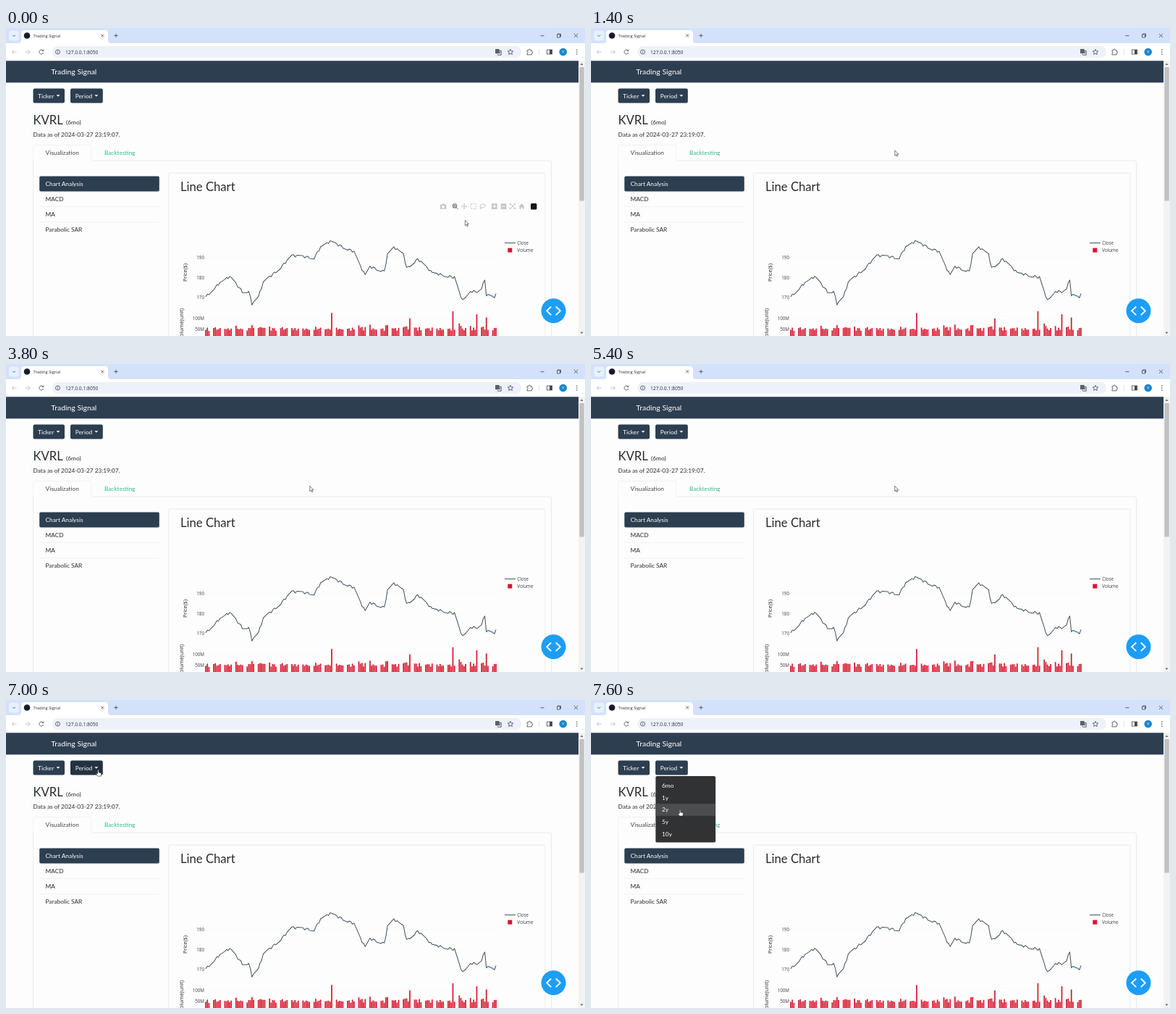
These frames come from a looping animation (800x425 px, 8 s). An HTML page:

```html
<!DOCTYPE html>
<html lang="en">
<head>
<meta charset="utf-8">
<title>Trading Signal</title>
<style>
html, body { margin: 0; width: 100%; height: 100%; overflow: hidden; background: #fdfdfd; }
svg { display: block; width: 800px; height: 425px; }
text { font: 8.33px Lato, sans-serif; fill: #272b2f; white-space: pre; }
.ui text, .plot text { font-family: "Open Sans", sans-serif; }
.plot text { font-size: 6.25px; fill: #3a3f48; }
.plot .axis { font-size: 7.29px; fill: #25282c; text-anchor: middle; }
.plot .end { text-anchor: end; }
text.white { fill: #fff; }
text.head { font-size: 16.67px; }
.icon { fill: none; stroke: #474747; stroke-width: .8; }
.dim { stroke: #b4b6ba; }
.edge { fill: none; stroke: #dee2e6; stroke-width: .7; }
.soft { stroke: #eaecef; }
.navy { fill: #2c3e50; }
#bar { fill: none; stroke: #c3c5c9; stroke-width: 1; }
#bar .solid { fill: #c3c5c9; stroke: none; }
</style>
</head>
<body>
<svg viewBox="0 0 800 425">
  <rect width="800" height="425" fill="#fdfdfd"/>

  <!-- browser window -->
  <g class="ui">
    <rect width="800" height="24" fill="#d3e1fa"/>
    <rect x="4" y="3.5" width="14" height="14" rx="4" fill="#e8f0fd"/>
    <path class="icon" d="M9 9.7l2 2 2-2"/>
    <path d="M17 21q4 0 4-4V7q0-4 4-4h112q4 0 4 4v10q0 4 4 4z" fill="#fff"/>
    <rect y="21" width="800" height="24.3" fill="#fff"/>
    <circle cx="29" cy="10.5" r="4.3" fill="#151a2c"/>
    <text x="37.5" y="12.8" style="font-size:5.8px">Trading Signal</text>
    <path class="icon" d="M131.2 8.5l4 4m0-4l-4 4M149.3 10.5h5.4m-2.7-2.7v5.4M738.5 10.7h5M785 8l5 5m0-5l-5 5"/>
    <path class="icon" d="M761.5 9h4v4h-4zM762.5 9V8h4v4h-1"/>
    <path class="icon dim" d="M14.5 33H8.3m2.8-2.8L8.3 33l2.8 2.8M27 33h6.2m-2.8-2.8l2.8 2.8-2.8 2.8"/>
    <path class="icon" d="M51.3 31.2a3 3 0 1 0 .5 2.7M51.8 29.6v2.2h-2.2"/>
    <rect x="64" y="25" width="648" height="16" rx="8" fill="#eef1f9"/>
    <circle cx="71.5" cy="33" r="3" class="icon"/>
    <path class="icon" d="M71.5 32.6v2M71.5 31.1v.7"/>
    <text x="82" y="35.5" style="font-size:6.7px">127.0.0.1:8050</text>
    <rect x="676" y="29" width="5.6" height="6" fill="#5b6068"/>
    <path class="icon" d="M680 31.3h4.2v6h-4.4l-1-2M681.3 33h2m-1 0v2.6"/>
    <path class="icon" d="M697 29.3l1.1 2.5 2.7.2-2.1 1.8.7 2.7-2.4-1.4-2.4 1.4.7-2.7-2.1-1.8 2.7-.2z"/>
    <path class="icon" d="M720 30.7h2.2q0-1.7 1.2-1.7t1.2 1.7h1.7v2q1.5 0 1.5 1.1t-1.5 1.1v2H720v-2q1.2-.2 1.2-1.1T720 32.6z"/>
    <path d="M736.5 29v8" stroke="#c8d6f0" stroke-width=".7"/>
    <rect x="747.5" y="30" width="7" height="6" class="icon"/>
    <rect x="751" y="30" width="3.5" height="6" fill="#474747"/>
    <circle cx="769.7" cy="33" r="5.3" fill="#1787d0"/>
    <text x="769.7" y="35" class="white" text-anchor="middle" style="font-size:5.5px">Y</text>
    <path d="M788.8 30v.01m0 2.99v.01m0 2.99v.01" stroke="#333" stroke-width="1.4" stroke-linecap="round"/>
    <rect x="791" y="45.3" width="9" height="380" fill="#f3f3f3"/>
    <rect x="792.4" y="54" width="6.4" height="184.5" fill="#c1c1c1"/>
    <path d="M793.5 51l2-2.5 2 2.5zM793.5 419.5l2 2.5 2-2.5z" fill="#666"/>
  </g>

  <!-- page -->
  <rect class="navy" y="45.3" width="791" height="30"/>
  <text class="white" x="62.3" y="64" style="font-size:10.42px">Trading Signal</text>
  <rect class="navy" x="37.5" y="83.5" width="43.5" height="20" rx="2.2"/>
  <rect class="navy" id="period" x="89" y="83.5" width="44.8" height="20" rx="2.2"/>
  <text class="white" x="44" y="96.9">Ticker</text>
  <text class="white" x="95.7" y="96.9">Period</text>
  <path d="M69.5 92.2h5l-2.5 2.5zM122.3 92.2h5l-2.5 2.5z" fill="#fff"/>
  <text class="head" x="37.5" y="132.8">KVRL</text>
  <text x="83" y="132.6">(6mo)</text>
  <text x="37.5" y="150" style="font-size:8.25px">Data as of 2024-03-27 23:19:07.</text>
  <path class="edge soft" d="M37.5 183V163.5q0-2 2-2H116q2 0 2 2V183"/>
  <path class="edge" d="M37.5 430V183.2M118 183.2H751.6q2 0 2 2V430"/>
  <text x="54.5" y="175.4" style="fill:#43484d">Visualization</text>
  <text x="135.9" y="175.4" style="fill:#2cba8c">Backtesting</text>
  <rect class="navy" x="46.2" y="204.4" width="165.6" height="21" rx="2"/>
  <path class="edge soft" d="M46 246.6h166M46 267.8h166"/>
  <text class="white" x="54.5" y="217.8">Chart Analysis</text>
  <text x="54.5" y="239.1">MACD</text>
  <text x="54.5" y="260.4">MA</text>
  <text x="54.5" y="281.4">Parabolic SAR</text>
  <rect class="edge" x="224.7" y="200.2" width="520.3" height="240" rx="2"/>
  <text class="head" x="241" y="225">Line Chart</text>

  <g id="bar">
    <path class="solid" fill-rule="evenodd" d="M600 243.8h2l.7-1.2h2.6l.7 1.2h2.3v6H600zM604 244.8a2 2 0 1 0 .01 0z"/>
    <g stroke="#70757c"><circle cx="620" cy="245.5" r="2.6" stroke-width="1.3"/><path d="M622 247.5l2.5 2.5M618.7 245.5h2.6m-1.3-1.3v2.6"/></g>
    <path d="M629.5 246h7.4m-3.7-3.7v7.4M631.9 243.4l1.3-1.3 1.3 1.3m-2.6 5.2l1.3 1.3 1.3-1.3m-3.8-3.8l-1.3 1.2 1.3 1.3m5-2.5l1.3 1.2-1.3 1.3"/>
    <rect x="642.4" y="242.6" width="7" height="7" stroke-dasharray="1.4 1"/>
    <path d="M656 248.3q-2.3-2 0-4.3 3-2.2 5.6-.2 1.4 2.2-1.6 3.8-2.5.8-4 .5-1 1-.3 2"/>
    <path class="solid" fill-rule="evenodd" d="M671 242.3h7.6v7.6H671zM674.2 243.9v1.6h-1.6v1.2h1.6v1.6h1.2v-1.6h1.6v-1.2h-1.6v-1.6zM683.7 242.3h7.6v7.6h-7.6zM685.3 245.5v1.2h4.4v-1.2z"/>
    <path d="M696.6 242.6l6.8 6.8m0-6.8l-6.8 6.8M696.3 244.3v-2h2m3.4 0h2v2m0 3.4v2h-2m-3.4 0h-2v-2"/>
    <path class="solid" d="M708.5 246.3l4-4 4 4h-1v3.4h-2v-2.3h-2v2.3h-2v-3.4z"/>
    <rect x="725" y="242" width="8.4" height="8.4" rx="1.5" fill="#11151c" stroke="none"/>
  </g>

  <g class="plot">
    <path d="M276 316.5H679M276 344.3H679M276 372H679M276 401.2H679M276 415.4H679" stroke="#f3f5f9" stroke-width=".5"/>
    <text class="end" x="274" y="318.7">190</text>
    <text class="end" x="274" y="346.5">180</text>
    <text class="end" x="274" y="374.2">170</text>
    <text class="end" x="274" y="403.4">100M</text>
    <text class="end" x="274" y="417.6">50M</text>
    <text class="axis" transform="translate(250.3 337.5) rotate(-90)">Price($)</text>
    <text class="axis" transform="translate(244.5 408.5) rotate(-90)">Volume(unit)</text>
    <path id="volume" stroke="#d9152c" stroke-width="1.7"/>
    <path id="close" fill="none" stroke="#4b5662" stroke-width="1.05" stroke-linejoin="round"/>
    <path d="M689 296.6h15" stroke="#4b5662" stroke-width="1.05"/>
    <rect x="693.3" y="303.6" width="6" height="6" fill="#d9152c"/>
    <text x="706.3" y="298.8">Close</text>
    <text x="706.3" y="308.9">Volume</text>
  </g>

  <circle cx="756.5" cy="390.3" r="17" fill="#1c9ef8"/>
  <path d="M753.2 384.5l-6 5.8 6 5.8M759.8 384.5l6 5.8-6 5.8" fill="none" stroke="#fff" stroke-width="1.8"/>

  <g id="menu">
    <rect x="89.3" y="105" width="82.8" height="91.6" rx="2.2" fill="#303234"/>
    <rect id="hover" x="89.6" width="82.2" height="16.6" fill="#4b4d4f"/>
  </g>

  <path id="arrow" d="M0 0V7.2L1.7 5.7 2.8 8.3 4 7.8 2.9 5.3H5.1z" fill="#fff" stroke="#222" stroke-width=".6"/>
  <path id="hand" d="M-.8.8Q0-.6.8.8V3.4L3.6 4Q4.6 4.4 4.4 5.5L3.8 8.6H-.6L-2.9 5.4Q-2.7 4.3-.8 5.5z" fill="#fff" stroke="#222" stroke-width=".6"/>
</svg>
<script>
const $ = id => document.getElementById(id);

// Turning points of the price: [day, dollars]
const turns = [[0, 170.4], [9, 177.5], [15, 180.5], [23, 173], [27, 173], [29, 166.9], [33, 170.3],
  [36, 177.5], [47, 185], [54, 191], [68, 189.8], [72, 195], [78, 198], [93, 192.8], [97, 185.6],
  [100, 181.2], [103, 185.4], [112, 183], [114, 191.4], [118, 195], [124, 191.7], [126, 184.6],
  [133, 189.2], [142, 182.4], [156, 180], [160, 170.1], [162, 169], [166, 173], [172, 173],
  [175, 178.7], [176, 171.4], [181, 169.8], [182, 172.5]];
const surges = { 79: 128, 128: 102, 155: 137, 170: 122, 176: 106 };  // volume in millions
const lastDay = 182;

function price(day) {
  const i = Math.max(1, turns.findIndex(turn => turn[0] >= day));
  const [d0, p0] = turns[i - 1], [d1, p1] = turns[i];
  return p0 + (p1 - p0) * (day - d0) / (d1 - d0) + .6 * Math.sin(day * 2.1);
}

let line = "", bars = "", previous = price(0);
for (let day = 0; day <= lastDay; day++) {
  if (day % 7 === 3 || day % 7 === 4) continue;  // weekend
  const x = 276 + day * 2.203, dollars = price(day);
  const million = surges[day] ?? 46 + 5 * Math.abs(dollars - previous) + 6 * Math.sin(day * 2.4);
  line += `${line ? "L" : "M"}${x} ${316.5 - (dollars - 190) * 2.775}`;
  bars += `M${x} 429.6V${429.6 - million * .284}`;
  previous = dollars;
}
$("close").setAttribute("d", line);
$("volume").setAttribute("d", bars);

["6mo", "1y", "2y", "5y", "10y"].forEach((label, i) =>
  $("menu").insertAdjacentHTML("beforeend", `<text class="white" x="98" y="${121.1 + i * 16.6}">${label}</text>`));

// Pointer steps: start time, place, and the menu row under it (-1: none)
const steps = [
  { t: 0, x: 634.3, y: 265.3, bar: true },
  { t: 1000, x: 570, y: 237, bar: true },
  { t: 1200, x: 450, y: 182 },
  { t: 1400, x: 419.8, y: 168.9 },
  { t: 2800, x: 419.8, y: 168.4 },
  { t: 6800, x: 160.5, y: 96 },
  { t: 7000, x: 127.3, y: 96.5, hand: true, button: true },
  { t: 7200, x: 126.3, y: 96.5, hand: true, button: true, row: -1 },
  { t: 7400, x: 125, y: 131, hand: true, row: 1 },
  { t: 7600, x: 123, y: 151.5, hand: true, row: 2 }
];
const show = (id, on) => $(id).style.display = on ? "" : "none";

function draw() {
  const now = performance.now() % 8000;
  const s = steps.findLast(step => step.t <= now);
  show("bar", s.bar);
  show("arrow", !s.hand);
  show("hand", s.hand);
  show("menu", s.row !== undefined);
  show("hover", s.row >= 0);
  $("hover").setAttribute("y", 110 + 16.6 * (s.row || 0));
  $("period").style.fill = s.button ? "#233240" : "";
  $(s.hand ? "hand" : "arrow").setAttribute("transform", `translate(${s.x} ${s.y})`);
  requestAnimationFrame(draw);
}
draw();
</script>
</body>
</html>
```
